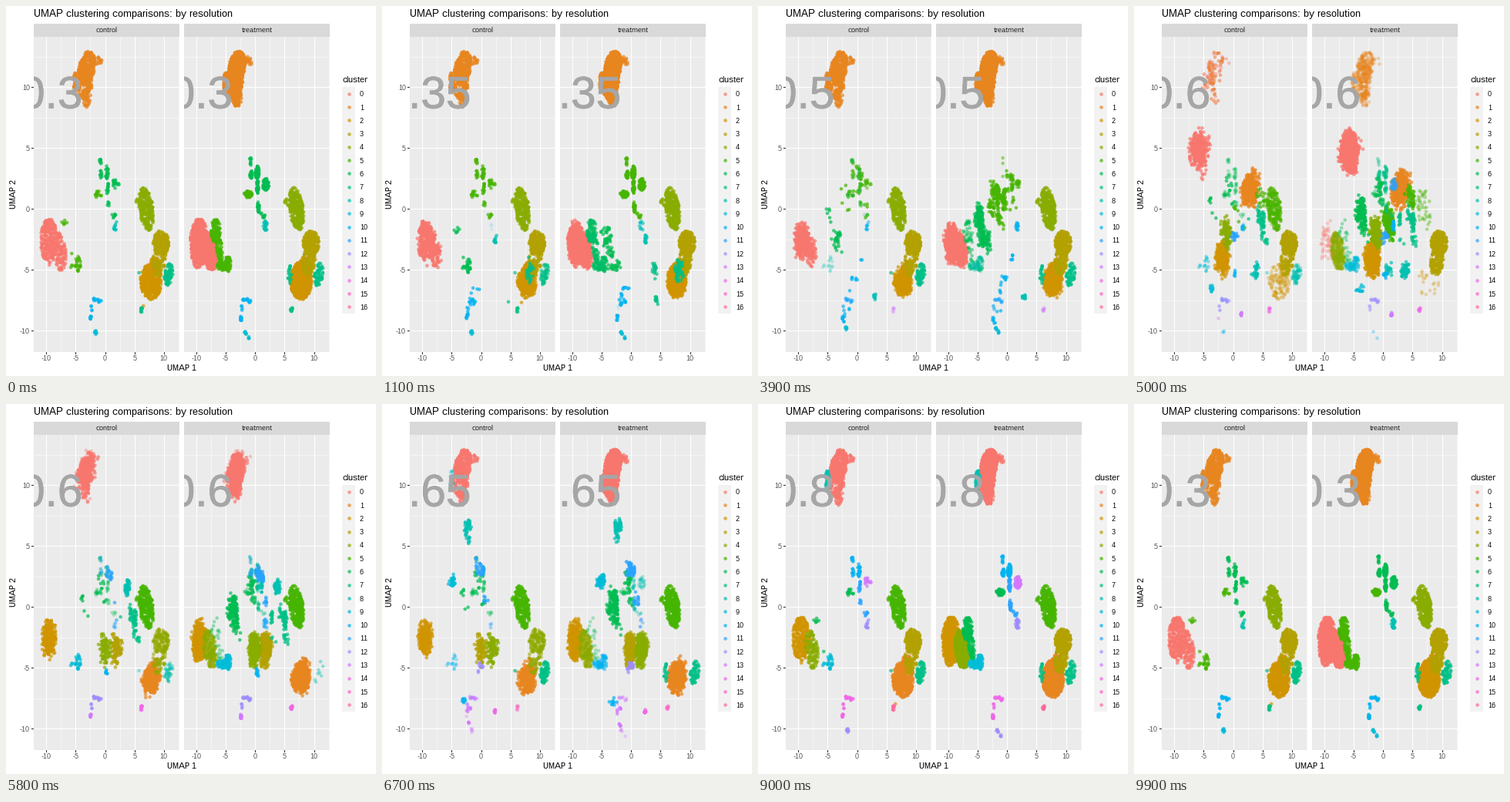
A matplotlib script that plays this animation: 480 px wide and 480 px high, repeating every 10 s.

```python
import numpy as np
import matplotlib.pyplot as plt
from matplotlib.animation import FuncAnimation
from matplotlib.patches import Rectangle
from matplotlib.patheffects import withStroke

SIZE = 480
FRAMES = 100
ALPHA = 0.7
DOT = 21
plt.rcParams.update({"font.family": "Liberation Sans",
                     "text.hinting": "default", "text.hinting_factor": 1})
rng = np.random.default_rng(7)


def hue_palette(n, c=100, l=65):
    """Evenly spaced hues in polar LUV, converted to sRGB."""
    h = np.radians(15 + 360 * np.arange(n) / n)
    u = c * np.cos(h) / (13 * l) + 0.1978
    v = c * np.sin(h) / (13 * l) + 0.4683
    y = np.full(n, ((l + 16) / 116) ** 3)
    xyz = np.array([9 * y * u / (4 * v), y, (12 - 3 * u - 20 * v) * y / (4 * v)])
    to_rgb = np.array([[3.2405, -1.5371, -0.4985],
                       [-0.9693, 1.8760, 0.0416],
                       [0.0556, -0.2040, 1.0572]])
    rgb = np.clip(to_rgb @ xyz, 0, 1).T
    return np.where(rgb <= 0.0031308, 12.92 * rgb, 1.055 * rgb ** (1 / 2.4) - 0.055)


COLORS = hue_palette(17)

# --- cell positions: each region is made of filled ellipses, per panel ---
cells = [{}, {}]


def blob(key, x, y, rx, ry, n_control, n_treat, tilt=0.0):
    for panel, n in enumerate((n_control, n_treat)):
        r = np.sqrt(rng.random(n))
        a = rng.random(n) * 2 * np.pi
        dy = ry * r * np.sin(a)
        pts = np.column_stack([x + rx * r * np.cos(a) + tilt * dy, y + dy])
        old = cells[panel].get(key, np.empty((0, 2)))
        cells[panel][key] = np.vstack([old, pts])


# top
blob("T", -3.1, 11.6, 1.4, 1.35, 260, 560, 0.25)
blob("T", -3.5, 10.4, 1.4, 1.4, 130, 350, 0.15)
blob("T", -1.2, 12.1, 0.7, 0.4, 18, 20)
blob("T", -3.1, 9.1, 0.8, 0.75, 30, 100)
blob("t", -5.0, 10.4, 0.4, 0.8, 45, 70)
# left
blob("L", -9.5, -2.6, 1.5, 1.8, 260, 480)
blob("L", -9.6, -3.4, 1.3, 1.5, 20, 190)
blob("l", -7.7, -3.5, 1.1, 1.6, 110, 540, -0.2)
blob("S", -6.8, -1.1, 0.6, 0.2, 6, 20)
blob("S", -6.7, -1.8, 0.8, 1.0, 0, 100)
blob("S", -6.1, -3.2, 0.5, 1.2, 1, 70, -0.25)
blob("s", -4.6, -4.5, 0.5, 0.65, 22, 40)
blob("s", -5.6, -4.7, 0.9, 0.35, 4, 50)
# right
blob("U", 7.0, 0.0, 1.2, 1.75, 240, 270, -0.25)
blob("U", 5.7, 0.6, 0.8, 0.3, 10, 14)
blob("R", 9.5, -2.8, 1.35, 1.0, 190, 220)
blob("R", 9.2, -4.2, 1.1, 1.3, 90, 150, 0.25)
blob("P", 7.8, -5.9, 1.8, 1.55, 390, 620)
blob("P", 8.5, -4.6, 0.9, 0.7, 30, 80)
blob("P", 6.5, -7.9, 0.1, 0.1, 1, 0)
blob("C", 10.8, -5.4, 0.75, 0.95, 75, 60, 0.25)
blob("C", 5.9, -5.4, 0.4, 0.8, 1, 18)
# centre
blob("B", -0.8, 3.9, 0.15, 0.35, 8, 10)
blob("B", -0.7, 2.8, 0.25, 0.35, 9, 20)
blob("B", 0.35, 3.0, 0.3, 0.55, 20, 65)
blob("b", 0.4, 1.8, 0.2, 0.6, 13, 35)
blob("b", 0.55, 0.2, 0.2, 0.5, 5, 22)
blob("b", 1.3, -0.5, 0.6, 0.25, 7, 8, -1)
blob("M", 1.8, 2.0, 0.6, 0.5, 16, 55)
blob("a", -1.2, 1.2, 0.7, 0.28, 13, 45)
blob("D", 1.75, -1.4, 0.35, 0.4, 9, 20)
# bottom
blob("E", -1.7, -7.45, 0.5, 0.12, 9, 9)
blob("E", -0.8, -7.6, 0.35, 0.12, 6, 6)
blob("E", -2.3, -8.1, 0.12, 0.3, 4, 4)
blob("e", -2.4, -9.0, 0.13, 0.22, 10, 12)
blob("G", -1.6, -10.15, 0.2, 0.15, 8, 6)
blob("G", -1.1, -10.55, 0.12, 0.1, 0, 4)
blob("F", 6.2, -8.3, 0.2, 0.2, 9, 12)

# Regions held by cluster 0, 1, 2 ... at each resolution; "-" is empty.
STATES = [s.split() for s in (
    "Ll Tt P R U Ssa BbM CF D G Ee",
    "Ll Tt P R U BbMa Ss CF D G Ee",
    "Ll Tt P R U BbMa C Ss F G DEe",
    "Ll Tt P R U Ssa BbM C F G DEe",
    "Ll Tt P R U BbMa Ss C F G DEe",
    "Ll Tt P R U SM Bba C s e DG E - F",
    "Tt P L R l U Sa Bb C s D M E e F",
    "T P L l R U Bba C t s G BD E e F",
    "T P L R l U Sa C bM t s B D EG e F",
    "T P L R l U Ma Ss C t b B E eG F",
    "T P L R l U Sa C t s B b DG M Ee - F",
)]
VALUES = [0.3 + 0.05 * i for i in range(len(STATES))]
KNOTS = [0, 9.5, 19, 28, 36.5, 45, 54, 63, 72, 81, 90, 99]


def members(panel, state, cluster):
    row = STATES[state]
    keys = row[cluster] if cluster < len(row) else "-"
    if keys == "-":
        return np.empty((0, 2))
    pts = np.vstack([cells[panel][k] for k in keys])
    # the two busiest clusters are re-ordered every time
    seed = sum(map(ord, keys)) + (100 * state if keys[0] in "PL" else 0)
    return np.random.default_rng(seed).permutation(pts)


GROUPS = [[[members(p, s, c) for c in range(len(COLORS))]
           for s in range(len(STATES))] for p in range(2)]


def blend(panel, k, p):
    """Matched cells travel, surplus cells fade in or out."""
    xy, rgba = [], []
    nxt = (k + 1) % len(STATES)
    for color, a, b in zip(COLORS, GROUPS[panel][k], GROUPS[panel][nxt]):
        n = min(len(a), len(b))
        parts = ((a[n:], 1 - p), (b[n:], p), (a[:n] + (b[:n] - a[:n]) * p, 1))
        for pts, fade in parts:
            if len(pts) and fade > 0:
                xy.append(pts)
                rgba.append(np.tile([*color, ALPHA * fade], (len(pts), 1)))
    return np.vstack(xy), np.vstack(rgba)


# --- fixed layout, measured in pixels from the top left ---
fig = plt.figure(figsize=(SIZE / 72, SIZE / 72), dpi=72, facecolor="white")
back = fig.add_axes([0, 0, 1, 1])
back.set(xlim=(0, SIZE), ylim=(SIZE, 0))
back.axis("off")

TOP, BOTTOM, WIDTH = 40, 448.5, 189.2
X_UNIT, Y_UNIT, Y_ZERO = 7.63, 15.8, 263.2
GREY = "#A6A6A6"


def box(x, y, w, h, color):
    back.add_patch(Rectangle((x, y), w, h, fc=color, lw=0))


def label(x, y, text, size=8.8, color="#4D4D4D", ha="center", **kw):
    kw.setdefault("va", "center_baseline")
    back.text(x, y, text, size=size, color=color, ha=ha, **kw)


def make_panel(left, name):
    zero = left + 92.5
    box(left, 23, WIDTH, TOP - 23, "#D9D9D9")
    label(left + WIDTH / 2, 31, name, color="#1A1A1A")
    ax = fig.add_axes([left / SIZE, 1 - BOTTOM / SIZE,
                       WIDTH / SIZE, (BOTTOM - TOP) / SIZE], facecolor="#EBEBEB")
    ax.set(xlim=((left - zero) / X_UNIT, (left + WIDTH - zero) / X_UNIT),
           ylim=((Y_ZERO - BOTTOM) / Y_UNIT, (Y_ZERO - TOP) / Y_UNIT),
           xticks=[], yticks=[])
    for spine in ax.spines.values():
        spine.set_visible(False)
    for v in np.arange(-10, 13, 2.5):
        lw = 1.07 if v % 5 == 0 else 0.53
        ax.axvline(v, color="white", lw=lw, zorder=0)
        ax.axhline(v, color="white", lw=lw, zorder=0)
    for v in range(-10, 11, 5):
        x = zero + v * X_UNIT
        back.plot([x, x], [BOTTOM, BOTTOM + 2.7], color="#333333", lw=1.07)
        label(x, 457, str(v))
    dots = ax.scatter([], [], s=DOT, linewidths=0, zorder=2)
    big = ax.text(-9.1, 8.27, "", size=58.5, color=GREY, ha="center",
                  va="baseline", clip_on=True, zorder=3,
                  path_effects=[withStroke(linewidth=0.8, foreground=GREY)])
    return dots, big


panels = [make_panel(36, "control"), make_panel(230.7, "treatment")]

for v in range(-10, 11, 5):
    y = Y_ZERO - v * Y_UNIT
    back.plot([33.3, 36], [y, y], color="#333333", lw=1.07)
    label(31, y, str(v), ha="right")

label(36, 14, "UMAP clustering comparisons: by resolution", 13.2, "black", "left",
      va="baseline")
label(228, 473, "UMAP 1", 11, "black", va="baseline")
label(10, 244, "UMAP 2", 11, "black", rotation=90, va="center")
label(436, 99, "cluster", 11, "black", "left", va="baseline")

STEP = 17.28
for i, color in enumerate(COLORS):
    y = 113.8 + i * STEP
    box(436, y - STEP / 2, STEP, STEP, "#F2F2F2")
    back.scatter([436 + STEP / 2], [y], s=DOT, color=[(*color, ALPHA)],
                 linewidths=0, zorder=3)
    label(459, y, str(i), color="black", ha="left")


def update(frame):
    u = np.interp(frame, KNOTS, range(len(KNOTS)))
    k = int(u)
    p = u - k
    shown = VALUES[(k + (p >= 0.5)) % len(STATES)]
    artists = []
    for i, (dots, big) in enumerate(panels):
        xy, rgba = blend(i, k % len(STATES), p)
        dots.set_offsets(xy)
        dots.set_facecolors(rgba)
        big.set_text(f"{shown:.2g}")
        artists += [dots, big]
    return artists


anim = FuncAnimation(fig, update, frames=FRAMES, interval=100,
                     repeat=True, repeat_delay=0, blit=False)
plt.show()
```
